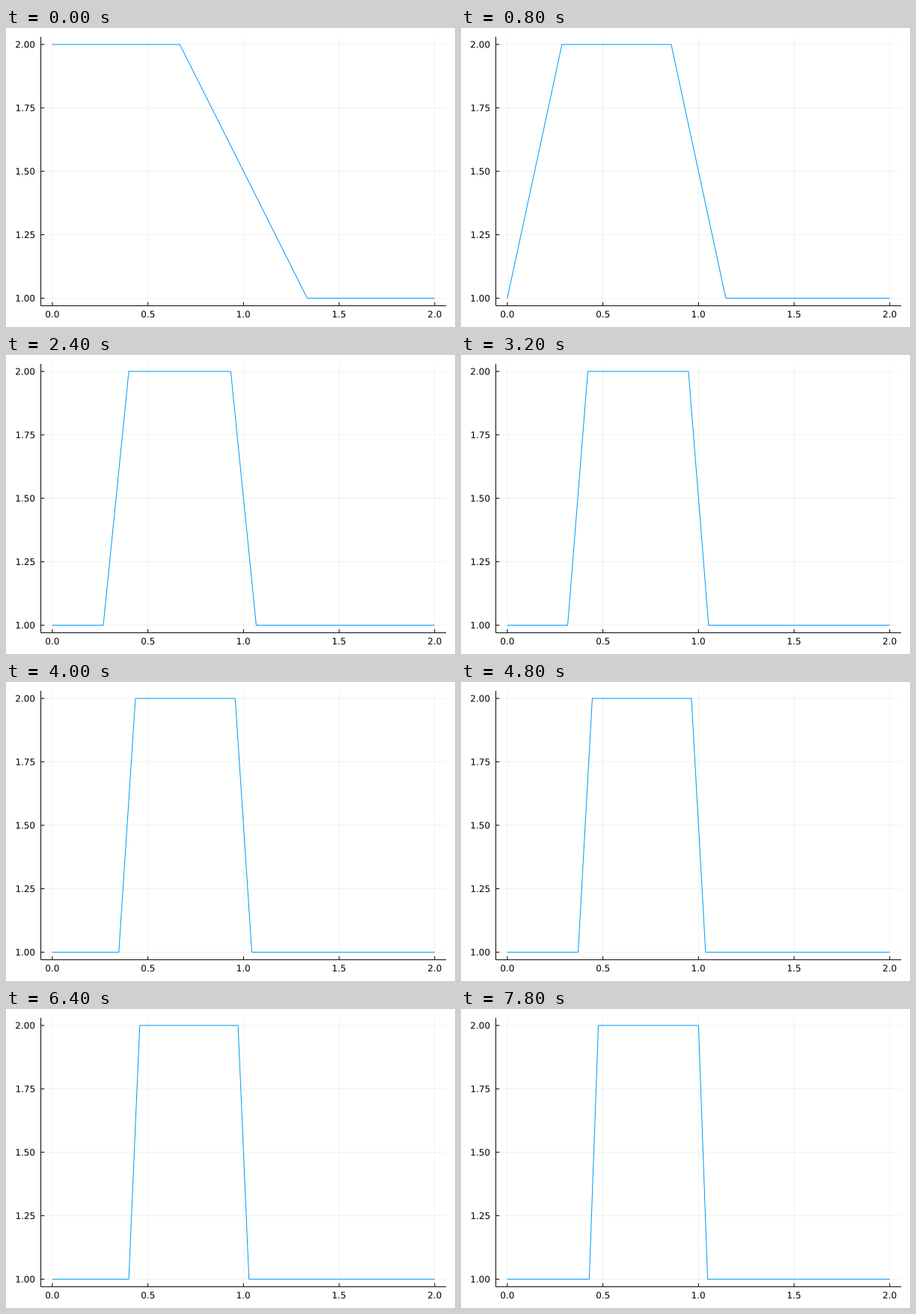
Animation of 600x400 px, one loop 8000 ms. Source, as a matplotlib script:

```python
import numpy as np
import matplotlib.pyplot as plt
from matplotlib.animation import FuncAnimation
from matplotlib.patches import PathPatch
from matplotlib.textpath import TextPath
from matplotlib.transforms import Affine2D

W, H, DPI = 600, 400, 100
PX = 72 / DPI  # one pixel in points
LEFT, RIGHT, TOP, BOTTOM = 46.57, 588.19, 11.81, 371.61
TICK, FONT = 4.7, 12
FIRST_COUNT, FRAMES, INTERVAL = 4, 40, 200

plt.rcParams["path.snap"] = False  # keep sub-pixel positions
plt.rcParams["font.family"] = "DejaVu Sans"
fig = plt.figure(figsize=(W / DPI, H / DPI), dpi=DPI, facecolor="white")
ax = fig.add_axes([0, 0, 1, 1])
ax.set_xlim(0, W)
ax.set_ylim(H, 0)
ax.axis("off")


def px(x):
    return LEFT + (x + 0.06) / 2.12 * (RIGHT - LEFT)


def py(y):
    return BOTTOM - (y - 0.97) / 1.06 * (BOTTOM - TOP)


def stroke(xs, ys, width=1.0, color="black", **style):
    return ax.plot(xs, ys, color=color, linewidth=width * PX,
                   solid_capstyle="butt", solid_joinstyle="miter", **style)[0]


def label(text, x, baseline, align):
    """Outline text; align is the share of the ink width left of x."""
    path = TextPath((0, 0), text, size=FONT)
    box = path.get_extents()
    place = Affine2D().translate(-box.x0 - align * box.width, 0)
    place.scale(1, -1).translate(x, baseline)
    ax.add_patch(PathPatch(place.transform_path(path), facecolor="black",
                           linewidth=0))


for v in np.linspace(0, 2, 5):
    x = px(v)
    stroke([x, x], [TOP, BOTTOM], 0.5, alpha=0.1)
    stroke([x, x], [BOTTOM - TICK, BOTTOM])
    label(f"{v:.1f}", x, 387.2, 0.5)
for v in np.linspace(1, 2, 5):
    y = py(v)
    stroke([LEFT, RIGHT], [y, y], 0.5, alpha=0.1)
    stroke([LEFT, LEFT + TICK], [y, y])
    label(f"{v:.2f}", 38.2, y + 0.365 * FONT, 1)
stroke([LEFT, RIGHT], [BOTTOM, BOTTOM])
stroke([LEFT, LEFT], [TOP, BOTTOM])
line = stroke([], [], color="#009AFA", zorder=3)


def square_pulse(cells):
    """Pulse of height 2 on roughly 0.5..1, sampled on a uniform grid."""
    x = np.linspace(0, 2, cells + 1)
    u = np.ones(cells + 1)
    u[cells // 4:cells // 2 + 1] = 2
    return x, u


def update(i):
    x, u = square_pulse(FIRST_COUNT + i - 1)
    line.set_data(px(x), py(u))
    return line,


anim = FuncAnimation(fig, update, frames=FRAMES, interval=INTERVAL,
                     repeat=True, repeat_delay=0)
plt.show()
```
